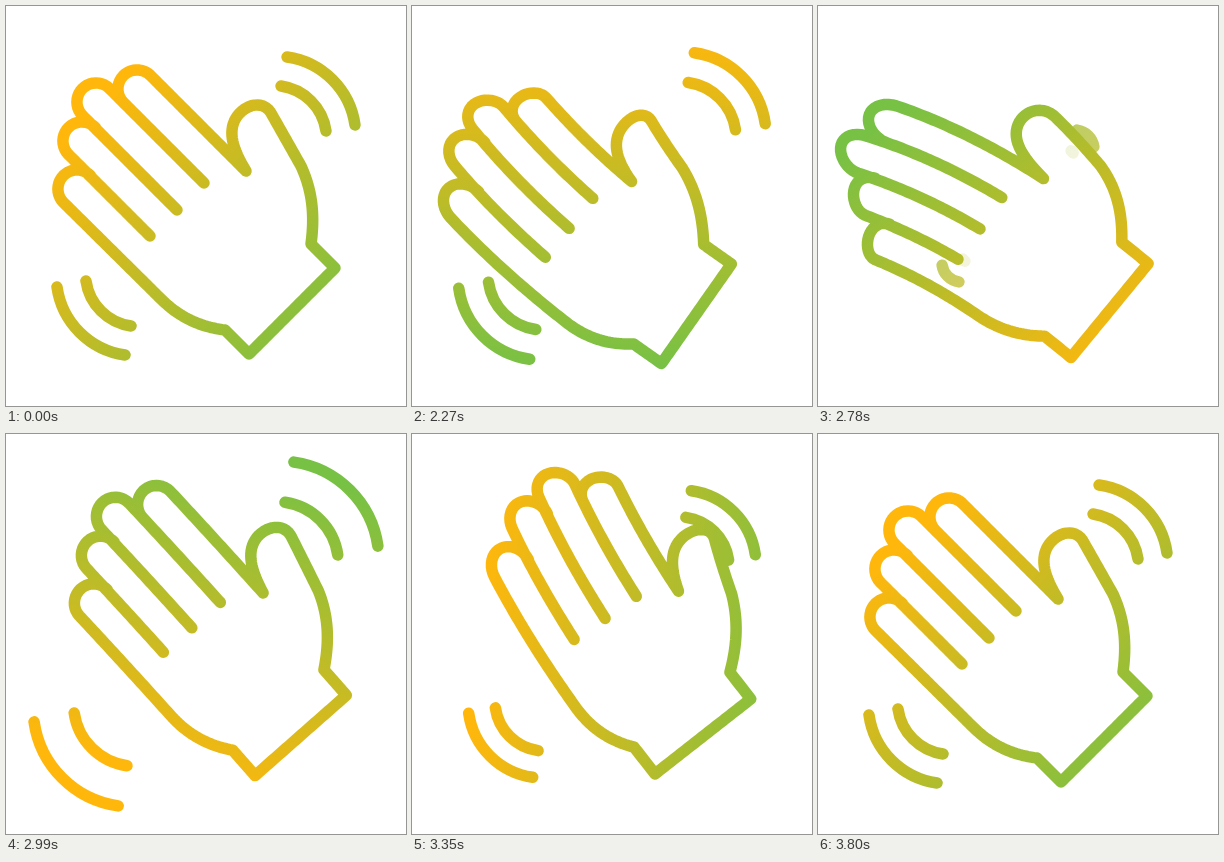
These frames come from a looping animation (400x400 px, 3830 ms). An HTML page:

```html
<!DOCTYPE html>
<html lang="en">
<head>
<meta charset="utf-8">
<title>Waving hand</title>
<style>
  html, body { margin: 0; width: 100%; height: 100%; overflow: hidden; background: #fff; }
  svg { display: block; width: 100%; height: 100%; }
  path { fill: none; stroke: url(#ink); stroke-width: 11.5; stroke-linecap: round; stroke-linejoin: round; }
</style>
</head>
<body>
<svg viewBox="0 0 400 400">
  <defs>
    <linearGradient id="ink" gradientUnits="userSpaceOnUse">
      <stop offset="0" stop-color="#ffb70c"/>
      <stop offset="1" stop-color="#77c145"/>
    </linearGradient>
  </defs>
  <path id="outer"/>
  <path id="inner"/>
  <path id="hand"/>
</svg>
<script>
const LOOP = 3830, START = 2000, SPAN = 1800, STEP = 30;
const { PI, sin, cos, max, min } = Math;
const el = id => document.getElementById(id);
const rad = deg => deg * PI / 180;
const pair = (x, y) => x.toFixed(2) + ' ' + y.toFixed(2);

// Each arc flies out until "gone"; a fresh one springs back from "born" (ms into the wave)
const arcs = [
  { node: el('outer'), x: 281, y: 51, r: 80, gone: 530, grow: 0.33, born: 735 },
  { node: el('inner'), x: 275, y: 80, r: 53, gone: 690, grow: 0.86, born: 770 }
];

const outline = [
  'M305 238L329 262', 'M329 262L243 348', 'M243 348L219 324',
  'M219 324C194 321 173 311 155 293L57.5 196.5A19 19 0 0 1 84.5 169.5',
  'M305 238C309 208 306 184 295 160L265 107C258 95 242 97 232 109C222 122 224 139 240 165',
  'M240 165L144.5 69.5A19 19 0 0 0 117.5 96.5',
  'M198 177L103.5 82.5A19 19 0 0 0 76.5 109.5L171 204',
  'M89.5 121.5A19 19 0 0 0 62.5 148.5L144 230'
].map(sample);

function sample(d) {
  const p = document.createElementNS('http://www.w3.org/2000/svg', 'path');
  p.setAttribute('d', d);
  const len = p.getTotalLength(), n = Math.ceil(len / 3);
  return Array.from({ length: n + 1 }, (_, i) => p.getPointAtLength(len * i / n));
}

// Slow start and stop, leaning a little forward
function ease(u) {
  const w = u ** 0.8;
  return w * w * (3 - 2 * w);
}

// Rotates about the wrist; the fingers curve further the longer they reach
function drawHand(u) {
  const e = ease(u), sway = sin(2 * PI * e);
  const turn = -14.5 * sin(2 * PI * u) * sin(PI * u ** 0.6);
  const bend = 32 * sin(3 * PI * e) - 6 * sin(PI * u);
  const px = 286, py = 305, reach = 266;
  const cx = px + 5 * (sin(PI * e) - sway), cy = py + 4 * sway;
  const c = cos(rad(turn + 225)), s = sin(rad(turn + 225));

  const place = p => {
    const x = p.x - px, y = p.y - py;
    const along = -(x + y) * Math.SQRT1_2, side = (x - y) * Math.SQRT1_2;
    const k = max(0, along) / reach;
    const tilt = bend * k ** 3 / 90;
    const a = along - side * sin(tilt);
    const b = side * cos(tilt) + bend * k ** 2.5;
    return pair(cx + a * c - b * s, cy + a * s + b * c);
  };
  el('hand').setAttribute('d', outline.map(pts => 'M' + pts.map(place).join('L')).join(''));
}

function drawArc({ node, x, y, r, gone, grow, born }, ms) {
  const age = ms - born, fade = 60;
  const leaving = ms < gone;
  const k = leaving ? 1 + grow * (ms / gone) ** 3
    : 1 - Math.exp(-0.0043 * max(0, age)) * cos(PI * max(0, age) / 340);
  const show = (leaving ? gone - ms : age) / fade;
  const ax = 252 + (x - 252) * k, ay = 148 + (y - 148) * k, R = r * k;
  node.setAttribute('opacity', max(0, min(1, show)));
  node.setAttribute('d',
    `M${pair(ax, ay)}A${R} ${R} 0 0 1 ${pair(400 - ay, 400 - ax)}` +
    `M${pair(ay, ax)}A${R} ${R} 0 0 0 ${pair(400 - ax, 400 - ay)}`);
}

// The gradient makes one full turn
function drawInk(u) {
  const a = rad(360 * ease(u) - 135);
  const dx = 168 * cos(a), dy = 168 * sin(a);
  const set = (k, v) => el('ink').setAttribute(k, v);
  set('x1', 235 + dx); set('y1', 194 + dy);
  set('x2', 235 - dx); set('y2', 194 - dy);
}

function draw(time) {
  const steps = Math.floor((time - START) / STEP);
  const ms = max(0, min(SPAN, steps * STEP));
  const u = ms / SPAN;
  drawInk(u);
  drawHand(u);
  // At the end of the wave the arcs are back at rest
  arcs.forEach(arc => drawArc(arc, ms % SPAN));
}

const begin = performance.now();
function tick() {
  draw((performance.now() - begin) % LOOP);
  requestAnimationFrame(tick);
}
tick();
</script>
</body>
</html>
```
